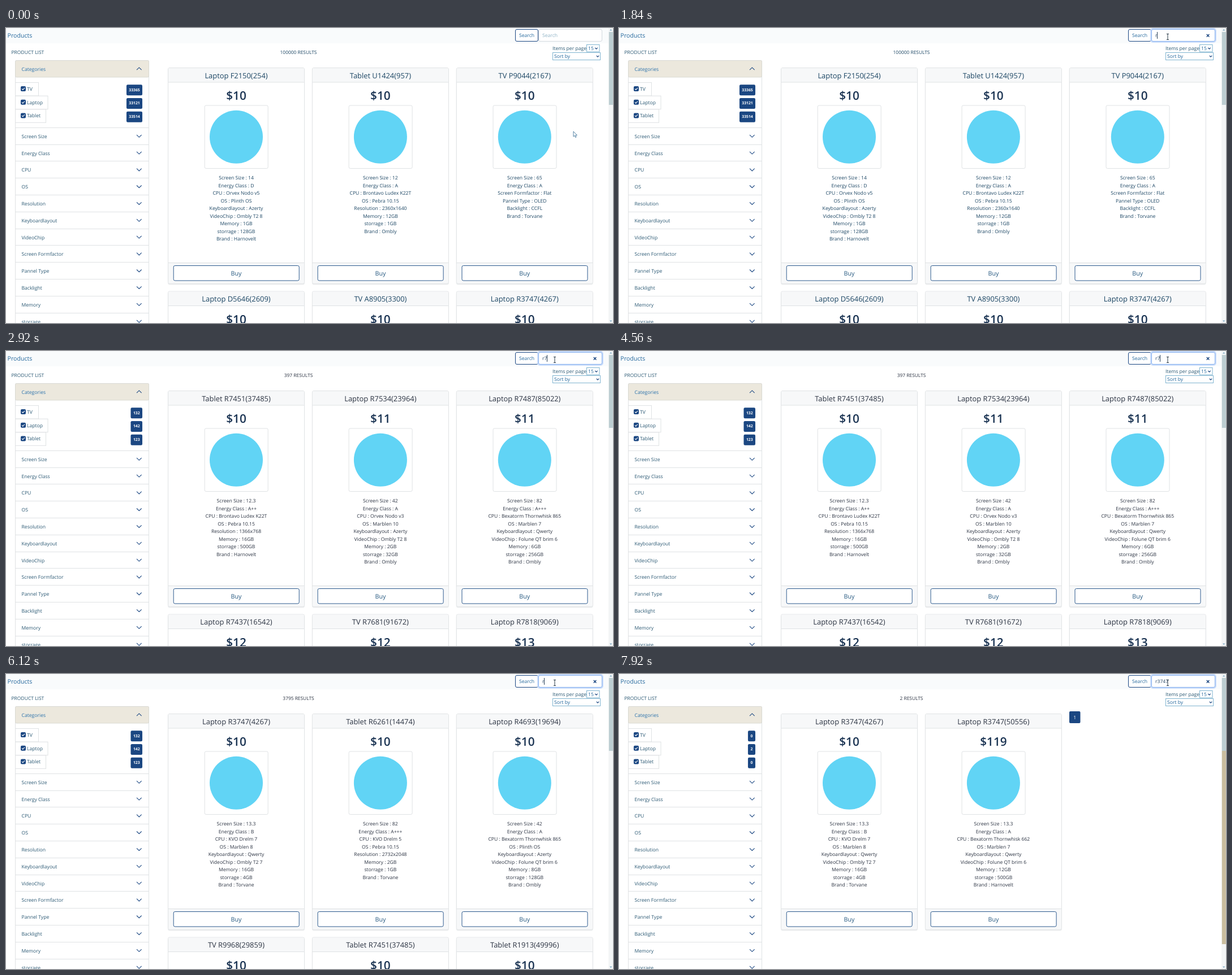
Recreate the animation shown at these times as an HTML page. Size 1073 by 522 pixels, loop 8 s.

```html
<!DOCTYPE html>
<html lang="en">
<head>
<meta charset="utf-8">
<title>Product search</title>
<style>
html, body { margin: 0; width: 100%; height: 100%; overflow: hidden; background: #fff; }
svg { display: block; width: 100%; height: 100%; }
text { font-family: "Open Sans", "Noto Sans", sans-serif; text-rendering: geometricPrecision; white-space: pre; }
</style>
</head>
<body>
<svg viewBox="0 0 1073 522"><g id="page"></g><g id="live"></g></svg>
<script>
const LOOP = 8000;
const NAVY = '#1b4782', LABEL = '#2a5873', BLUE = '#23679c', LINE = '#dfe2e4';
const EARLY_INK = '#1c4664', LATE_INK = '#2b3342';

// ---- Drawing helpers: every text is centred vertically on y ----
const text = (x, y, content, { size = 8.6, fill = LABEL, anchor = 'start', weight = 400 } = {}) =>
  `<text x="${x}" y="${y + size * 0.36}" font-size="${size}" fill="${fill}" text-anchor="${anchor}" font-weight="${weight}">${content}</text>`;
const box = (x, y, w, h, fill, stroke = 'none', r = 0, extra = '') =>
  `<rect x="${x}" y="${y}" width="${w}" height="${h}" rx="${r}" fill="${fill}" stroke="${stroke}" ${extra}/>`;
const path = (d, stroke, width = 1, fill = 'none') =>
  `<path d="${d}" fill="${fill}" stroke="${stroke}" stroke-width="${width}"/>`;
const chevron = (x, y, half, rise, color = NAVY, width = 1.1) =>
  path(`M${x - half} ${y - rise}l${half} ${2 * rise}l${half} ${-2 * rise}`, color, width);

// ---- Product data ----
const SPEC_KEYS = {
  Laptop: ['Screen Size', 'Energy Class', 'CPU', 'OS', 'Keyboardlayout', 'VideoChip', 'Memory', 'storrage', 'Brand'],
  Tablet: ['Screen Size', 'Energy Class', 'CPU', 'OS', 'Resolution', 'Memory', 'storrage', 'Brand'],
  TV: ['Screen Size', 'Energy Class', 'Screen Formfactor', 'Pannel Type', 'Backlight', 'Brand'],
};
const product = (title, price, specs = '') => ({ title, price, specs: specs ? specs.split('|') : [] });

const foundLaptop = product('Laptop R3747(4267)', 10, '13.3|B|KVO Drelm 7|Marblen 8|Qwerty|Ombly T2 7|16GB|4GB|Torvane');
const RESULTS = {
  all: { total: 100000, ink: EARLY_INK, items: [
    product('Laptop F2150(254)', 10, '14|D|Orvex Nodo v5|Plinth OS|Azerty|Ombly T2 8|1GB|128GB|Harnovelt'),
    product('Tablet U1424(957)', 10, '12|A|Brontavo Ludex K22T|Pebra 10.15|2360x1640|12GB|1GB|Ombly'),
    product('TV P9044(2167)', 10, '65|A|Flat|OLED|CCFL|Torvane'),
    product('Laptop D5646(2609)', 10),
    product('TV A8905(3300)', 10),
    product('Laptop R3747(4267)', 10),
  ] },
  r: { total: 3795, ink: LATE_INK, items: [
    foundLaptop,
    product('Tablet R6261(14474)', 10, '82|A+++|KVO Drelm 5|Pebra 10.15|2732x2048|2GB|1GB|Torvane'),
    product('Laptop R4693(19694)', 10, '42|A|Bexatorm Thornwhisk 865|Plinth OS|Azerty|Folune QT brim 6|8GB|128GB|Ombly'),
    product('TV R9968(29859)', 10),
    product('Tablet R7451(37485)', 10),
    product('Tablet R1913(49996)', 10),
  ] },
  r7: { total: 397, ink: LATE_INK, items: [
    product('Tablet R7451(37485)', 10, '12.3|A++|Brontavo Ludex K22T|Pebra 10.15|1366x768|16GB|500GB|Harnovelt'),
    product('Laptop R7534(23964)', 11, '42|A|Orvex Nodo v3|Marblen 10|Azerty|Ombly T2 8|2GB|32GB|Ombly'),
    product('Laptop R7487(85022)', 11, '82|A+++|Bexatorm Thornwhisk 865|Marblen 7|Qwerty|Folune QT brim 6|6GB|256GB|Ombly'),
    product('Laptop R7437(16542)', 12),
    product('TV R7681(91672)', 12),
    product('Laptop R7818(9069)', 13),
  ] },
  r3747: { total: 2, ink: LATE_INK, items: [
    foundLaptop,
    product('Laptop R3747(50556)', 119, '13.3|A|Bexatorm Thornwhisk 662|Marblen 7|Qwerty|Folune QT brim 6|12GB|500GB|Harnovelt'),
  ] },
};

// ---- Timeline: [start, value] ----
const RESULT_TIMES = [[0, 'all'], [2220, 'r'], [2850, 'r7'], [6120, 'r'], [7920, 'r3747']];
const R_COUNTS = [1283, 1241, 1271];
const COUNT_TIMES = [[0, [33365, 33121, 33514]], [2370, R_COUNTS], [2920, [132, 142, 123]], [6190, R_COUNTS], [7920, [0, 2, 0]]];
const TYPED_TIMES = [[0, ''], [1840, 'r'], [2450, 'r7'], [5720, 'r'], [6510, 'r3'], [6740, 'r37'], [6970, 'r374'], [7290, 'r3747']];
const FOCUS_TIMES = [[0, 0], [820, 0.4], [890, 0.8], [970, 1]];
const POINTER_TIMES = [
  [0, [1003, 183]], [70, [969, 79]], [210, [968, 68]], [280, [967, 56]], [360, [967, 45]],
  [430, [968, 35]], [510, [969, 27]], [580, [970, 17]], [660, [970, 14]], [1520, [970, 15]],
];
const CARET_TOGGLES = [820, 1350, 1840, 2370, 2450, 3000, 3550, 4110, 4560, 5170, 5650, 6190, 6510, 7750];
const valueAt = (track, t) => track.findLast(([start]) => start <= t)[1];

// ---- Fixed page parts ----
function drawPage() {
  let out = box(0, 0, 1065, 27, '#f9fbfc')
    + text(2.5, 13.5, 'Products', { size: 10.6, fill: BLUE })
    + text(9.5, 43, 'PRODUCT LIST', { size: 8.5 })
    + box(900.5, 2.5, 40, 21, '#fff', NAVY, 2.5)
    + text(920.5, 13.3, 'Search', { anchor: 'middle', fill: BLUE })
    + text(966, 35.8, 'Items per page')
    + box(1026.5, 29.5, 22.5, 12.5, '#fff', '#7fb4d0')
    + text(1029, 36, '15', { fill: BLUE }) + chevron(1043.5, 36, 2.2, 1.1, NAVY, 1.3)
    + box(966.5, 43.5, 84, 13, '#fff', '#7fb4d0')
    + text(969, 50, 'Sort by', { fill: BLUE }) + chevron(1046, 50, 2.2, 1.1, NAVY, 1.3);

  out += box(16.5, 57.5, 236, 480, '#fff', LINE, 2)
    + box(16.5, 57.5, 236, 29.5, '#ece8dd', '#d9d9d3', 2)
    + text(27.5, 72.7, 'Categories', { fill: '#2a71ab' })
    + chevron(235.3, 72, 4.3, -2.1);

  [['TV', 41], ['Laptop', 57.5], ['Tablet', 54]].forEach(([name, width], i) => {
    const y = 96 + i * 23.7;
    out += box(16.5, y + 0.5, width, 23.5, '#fff', LINE)
      + box(26, y + 7, 9, 9, NAVY, 'none', 2)
      + path(`M28 ${y + 11.6}l1.8 1.8l3.3 -3.6`, '#fff', 1.1)
      + text(37, y + 12, name);
  });

  ['Screen Size', 'Energy Class', 'CPU', 'OS', 'Resolution', 'Keyboardlayout', 'VideoChip', 'Screen Formfactor',
    'Pannel Type', 'Backlight', 'Memory', 'storrage'].forEach((name, i) => {
    const y = 191.7 + i * 29.8;
    out += path(`M16 ${Math.round(y - 15) - 0.5}H253`, LINE)
      + text(27.5, y, name) + chevron(235.3, y - 0.5, 4.3, 2.1);
  });
  return out;
}

// ---- Changing parts ----
function drawCard({ title, price, specs }, index, ink) {
  const x = 286.5 + (index % 3) * 254.9, y = index < 3 ? 70.5 : 466, mid = x + 120.5;
  const centred = (dy, content, style) => text(mid, y + dy, content, { anchor: 'middle', fill: ink, ...style });
  const keys = SPEC_KEYS[title.split(' ')[0]];
  return box(x, y + 1.5, 241, 382, '#eceeef', '#eceeef', 2.5)
    + box(x, y, 241, 381.5, '#fff', LINE, 2.5)
    + box(x + 0.5, y + 0.5, 240, 25, '#f7f8f9', 'none', 2)
    + path(`M${x} ${y + 25.5}h241`, LINE)
    + centred(13.5, title, { size: 12.9 })
    + centred(49.2, '$' + price, { size: 20.8, weight: 600, fill: '#1b3453' })
    + box(mid - 55.8, y + 66.5, 112, 111.5, '#fff', LINE, 2.5)
    + `<circle cx="${mid}" cy="${y + 122.3}" r="47" fill="#61d4f5"/>`
    + specs.map((value, i) => centred(194.5 + i * 13.5, `${keys[i]} : ${value}`)).join('')
    + box(x + 0.5, y + 345, 240, 36, '#f7f8f9', 'none', 2)
    + path(`M${x} ${y + 345}h241`, LINE)
    + box(x + 9.7, y + 350, 222, 26.5, '#fff', '#2d5a8e', 2.5)
    + centred(364, 'Buy', { size: 10.7, fill: '#24577f' });
}

function drawResults(name) {
  const { total, ink, items } = RESULTS[name];
  let out = text(517, 43, `${total} RESULTS`, { size: 8.4, anchor: 'middle', fill: ink })
    + items.map((item, i) => drawCard(item, i, ink)).join('')
    + box(1065, 0, 8, 522, '#f3f5f6')
    + box(1065.8, 7, 7, 129, '#bccdd1')
    + path('M1067 4.5l2.2 -2.5l2.2 2.5zM1067 517.5l2.2 2.5l2.2 -2.5z', 'none', 0, '#7fa9c4');
  if (items.length < 3) {
    out += box(1065.8, 136, 7, 342, '#c9bd9f')
      + box(796, 66, 19.5, 21, NAVY, 'none', 2)
      + text(805.8, 76.5, '1', { fill: '#fff', anchor: 'middle' });
  }
  return out;
}

const drawCounts = counts => counts.map((count, i) => {
  const width = 9.3 + 3.75 * String(count).length, y = 100.3 + i * 23.7;
  return box(241 - width, y, width, 19, NAVY, 'none', 2.2)
    + text(241 - width / 2, y + 8.8, count, { size: 6.8, weight: 700, fill: '#fff', anchor: 'middle' });
}).join('');

function drawSearch(typed, focus, caretOn) {
  let out = box(941.5, 2.5, 112, 21, '#fff', '#c9dcfb', 2.5, `stroke-width="5" opacity="${focus}"`)
    + box(941.5, 2.5, 112, 21, '#fff', focus ? '#86b0ee' : '#d3d9de', 2.5)
    + text(948, 13.3, typed || 'Search', { fill: typed ? '#2a4a68' : '#8fb3c6' });
  if (typed) out += path('M1038.8 11l4.6 4.8m0 -4.8l-4.6 4.8', NAVY, 1.5);
  if (caretOn) {
    const x = typed ? 951.5 + 4.92 * (typed.length - 1) : 948;
    out += box(Math.floor(x), 7, 1, 12, '#243c55');
  }
  return out;
}

function drawPointer([x, y]) {
  return y < 24
    ? path(`M${x - 2} ${y - 4.5}h4m-2 0v10m-2 0h4`, '#2b3a48')
    : path(`M${x} ${y}v9.2l2.1 -1.9l1.5 3.3l1.5 -.7l-1.4 -3.2h2.8z`, '#2d6690', 0.8, '#fff');
}

const page = document.getElementById('page');
const live = document.getElementById('live');
page.innerHTML = drawPage();
let shown = '';

function render(now) {
  const t = now % LOOP;
  const results = valueAt(RESULT_TIMES, t), counts = valueAt(COUNT_TIMES, t);
  const typed = valueAt(TYPED_TIMES, t), focus = valueAt(FOCUS_TIMES, t), pointer = valueAt(POINTER_TIMES, t);
  const caretOn = CARET_TOGGLES.filter(time => time <= t).length % 2 === 1;
  const state = [results, counts, typed, focus, pointer, caretOn].join();
  if (state !== shown) {
    shown = state;
    live.innerHTML = drawResults(results) + drawCounts(counts) + drawSearch(typed, focus, caretOn) + drawPointer(pointer);
  }
}

const start = performance.now();
function tick() {
  render(performance.now() - start);
  requestAnimationFrame(tick);
}
tick();
</script>
</body>
</html>
```
